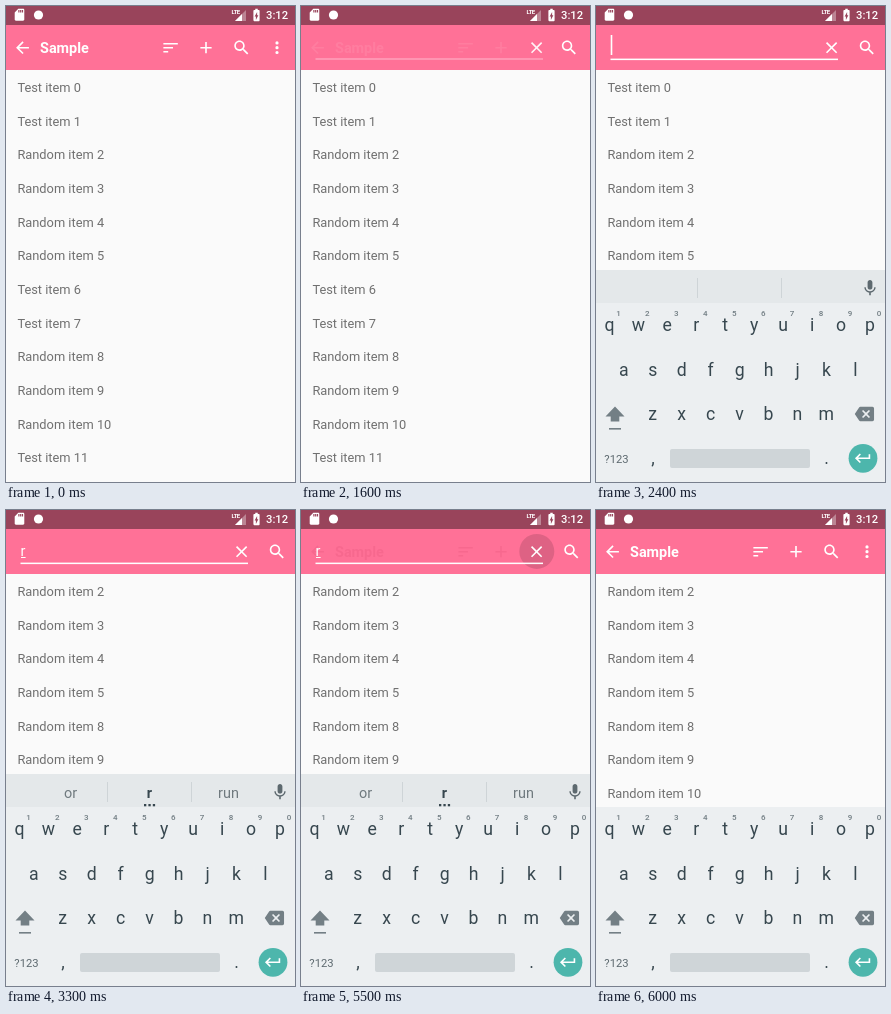
Recreate the animation shown at these times as an HTML page. Size 289 px wide and 476 px high, loop 7100 ms.

```html
<!DOCTYPE html>
<html lang="en">
<head>
<meta charset="utf-8">
<title>Search in a list</title>
<style>
html, body { margin: 0; width: 100%; height: 100%; overflow: hidden; background: #fafafa; }
svg { display: block; width: 100%; height: 100%; font-family: Roboto, sans-serif; }
</style>
</head>
<body>
<svg id="stage" viewBox="0 0 289 476" xmlns="http://www.w3.org/2000/svg"></svg>
<script>
const LOOP = 7100, STEP = 100;
const U = 0.803; // pixels per dp
const ROW = 33.68, BAR_Y = 41.7;
const INK = '#37474f', GREY = '#737f85';

const PATHS = {
  back: 'M20 11H7.83l5.59-5.59L12 4l-8 8 8 8 1.41-1.41L7.83 13H20v-2z',
  sort: 'M3 18h6v-2H3v2zM3 6v2h18V6H3zm0 7h12v-2H3v2z',
  add: 'M19 13h-6v6h-2v-6H5v-2h6V5h2v6h6v2z',
  search: 'M15.5 14h-.79l-.28-.27C15.41 12.59 16 11.11 16 9.5 16 5.91 13.09 3 9.5 3S3 5.91 3 9.5 5.91 16 9.5 16c1.61 0 3.09-.59 4.23-1.57l.27.28v.79l5 4.99L20.49 19l-4.99-5zm-6 0C7.01 14 5 11.99 5 9.5S7.01 5 9.5 5 14 7.01 14 9.5 11.99 14 9.5 14z',
  more: 'M12 8a2 2 0 1 0 0-4 2 2 0 0 0 0 4zm0 2a2 2 0 1 0 0 4 2 2 0 0 0 0-4zm0 6a2 2 0 1 0 0 4 2 2 0 0 0 0-4z',
  clear: 'M19 6.41L17.59 5 12 10.59 6.41 5 5 6.41 10.59 12 5 17.59 6.41 19 12 13.41 17.59 19 19 17.59 13.41 12z',
  card: 'M18 2h-8L4 8v12c0 1.1.9 2 2 2h12c1.1 0 2-.9 2-2V4c0-1.1-.9-2-2-2zm-6 6h-2V4h2v4zm3 0h-2V4h2v4zm3 0h-2V4h2v4z',
  battery: 'M15.67 4H14V2h-4v2H8.33C7.6 4 7 4.6 7 5.33v15.33C7 21.4 7.6 22 8.33 22h7.33c.74 0 1.34-.6 1.34-1.33V5.33C17 4.6 16.4 4 15.67 4zM11 20v-5.5H9L13 7v5.5h2L11 20z',
  mic: 'M12 14c1.66 0 2.99-1.34 2.99-3L15 5c0-1.66-1.34-3-3-3S9 3.34 9 5v6c0 1.66 1.34 3 3 3zm5.3-3c0 3-2.54 5.1-5.3 5.1S6.7 14 6.7 11H5c0 3.41 2.72 6.23 6 6.72V21h2v-3.28c3.28-.48 6-3.3 6-6.72h-1.7z',
  erase: 'M22 3H7c-.69 0-1.23.35-1.59.88L0 12l5.41 8.11c.36.53.9.89 1.59.89h15c1.1 0 2-.9 2-2V5c0-1.1-.9-2-2-2zm-3 12.59L17.59 17 14 13.41 10.41 17 9 15.59 12.59 12 9 8.41 10.41 7 14 10.59 17.59 7 19 8.41 15.41 12 19 15.59z',
  enter: 'M19 7v4H5.83l3.58-3.59L8 6l-6 6 6 6 1.41-1.41L5.83 13H21V7h-2z'
};

function add(parent, tag, attrs = {}, text) {
  const el = document.createElementNS('http://www.w3.org/2000/svg', tag);
  for (const key in attrs) el.setAttribute(key, attrs[key]);
  if (text !== undefined) el.textContent = text;
  parent.appendChild(el);
  return el;
}
const set = (el, key, value) => el.setAttribute(key, value);
const show = (el, on) => set(el, 'visibility', on ? 'visible' : 'hidden');
const group = (parent, attrs) => add(parent, 'g', attrs);
const rect = (parent, x, y, width, height, fill, rx = 0) =>
  add(parent, 'rect', { x, y, width, height, fill, rx });
const label = (parent, text, x, y, size, attrs) =>
  add(parent, 'text', { x, y, 'font-size': size, ...attrs }, text);
const place = (x, y, s) => `translate(${x - 12 * s} ${y - 12 * s}) scale(${s})`;
const icon = (parent, name, x, y, s = U, attrs) =>
  add(parent, 'path', { d: PATHS[name], transform: place(x, y, s), ...attrs });

const svg = document.getElementById('stage');
const clamp = v => Math.min(1, Math.max(0, v));
const ease = v => (1 - Math.cos(Math.PI * clamp(v))) / 2;
const mix = (a, b, k) => a + (b - a) * k;

rect(svg, 0, 0, 289, 476, '#fafafa');

// List
const list = group(svg, { fill: '#707070' });
const tests = [0, 1, 6, 7, 11];
let hits = 0;
const items = Array.from({ length: 12 }, (_, i) => {
  const test = tests.includes(i);
  const el = label(list, `${test ? 'Test' : 'Random'} item ${i}`, 11.4, 0, 16 * U);
  return { el, test, from: i, to: test ? i : hits++ };
});

// Status bar and toolbar
rect(svg, 0, 0, 289, 19.3, '#99445b');
rect(svg, 0, 19, 289, 45, '#ff7197');
const status = group(svg, { fill: '#fff' });
icon(status, 'card', 13.5, 8.8, 0.6);
add(status, 'circle', { cx: 32.5, cy: 9, r: 4.6 });
label(status, 'LTE', 225.6, 8.2, 6, { 'font-weight': 700, 'letter-spacing': -0.6 });
add(status, 'path', { d: 'M229 15L240 4V15Z', opacity: 0.35 });
add(status, 'path', { d: 'M229 15L236 8V15Z' });
icon(status, 'battery', 250.5, 9, 0.62);
label(status, '3:12', 260, 13.2, 14 * U, { 'font-weight': 500 });

const ripple = add(svg, 'circle', { cy: 41.4, fill: '#000' });

const bar = group(svg);
icon(bar, 'back', 16.5, BAR_Y);
label(bar, 'Sample', 34, 47, 18 * U, { 'font-weight': 700 });
icon(bar, 'sort', 164.6, BAR_Y);
icon(bar, 'add', 200, BAR_Y);
const more = icon(svg, 'more', 271, BAR_Y, U, { fill: '#fff' });
const search = icon(svg, 'search', 235.5, BAR_Y, U, { fill: '#fff' });

const field = group(svg, { fill: '#fff' });
const line = rect(field, 14.5, 52.6, 227.5, 1.5, '#fff');
icon(field, 'clear', 235.6, BAR_Y);
const typed = group(field);
label(typed, 'r', 14.6, 45.6, 18 * U);
rect(typed, 15, 47, 4.6, 1, '#fff');
const cursor = rect(svg, 14.7, 29, 1.6, 20, '#fff');

// Keyboard
const cover = rect(svg, 0, 264, 289, 212, '#fafafa');
const board = group(svg, { 'text-anchor': 'middle' });

const strip = group(board, { fill: '#6f797e' });
rect(strip, 0, 264, 289, 33, '#e4e8ea');
for (const x of [101, 185]) rect(strip, x, 272, 1, 20, '#ced4d7');
icon(strip, 'mic', 274, 282, U, { fill: '#5d696f' });
const hints = group(strip);
label(hints, 'or', 64.5, 287.5, 18 * U);
label(hints, 'r', 143.3, 287.5, 18 * U, { fill: INK, 'font-weight': 700 });
label(hints, 'run', 222.5, 287.5, 18 * U);
for (let i = 0; i < 3; i++) rect(hints, 138 + i * 4.4, 294, 2.3, 2.3, INK);

rect(board, 0, 297, 289, 179, '#eceff1');
const keys = group(board, { fill: INK });
const keyRow = (chars, x, y) => [...chars].forEach((c, i) =>
  label(keys, c, x + i * 28.95, y, 22 * U));
keyRow('qwertyuiop', 13.4, 325.4);
keyRow('asdfghjkl', 27.8, 370);
keyRow('zxcvbnm', 56.6, 414.4);
[...'1234567890'].forEach((c, i) =>
  label(keys, c, 22.4 + i * 28.95, 310, 8, { fill: '#717d83', 'font-weight': 500 }));
add(keys, 'path', { d: 'M19 400.5L28.5 410.5H23.3V415.5H14.7V410.5H9.5Z', fill: GREY });
rect(keys, 13, 422, 12, 1.6, GREY);
icon(keys, 'erase', 268.4, 408, U, { fill: GREY });
label(keys, '?123', 20.5, 456.6, 14 * U, { fill: '#5d696f' });
label(keys, ',', 57, 458, 22 * U);
label(keys, '.', 230.5, 458, 22 * U);
rect(keys, 74, 443, 140, 19, '#cfd5d8', 2);
add(keys, 'circle', { cx: 267, cy: 452.3, r: 14.4, fill: '#4db6ac' });
icon(keys, 'enter', 267, 452.3, U, { fill: '#fff' });

const between = (t, a, b) => t >= a && t < b;

function drawBar(t) {
  const closing = t >= 5500;
  const phase = ease((t - (closing ? 5500 : 1200) + 40) / 540);
  const open = closing ? 1 - phase : t < 1200 ? 0 : phase;
  const ghost = closing && t < 5600;

  set(bar, 'fill', ghost ? '#d9486f' : '#fff');
  set(bar, 'opacity', ghost ? 0.2 : 1 - open);
  set(field, 'opacity', open);
  set(search, 'transform', place(mix(235.5, 271, open), BAR_Y, U));
  show(more, t < 1200 || t >= 6000);

  const focused = t >= 2000;
  set(line, 'height', focused ? 1.5 : 0.8);
  set(line, 'opacity', focused ? 1 : 0.7);
  show(typed, t >= 2600);

  const start = closing ? 5500 : 1200;
  set(ripple, 'cx', closing ? 235.8 : 237.8);
  set(ripple, 'r', closing ? 17.5 : 16.5);
  set(ripple, 'opacity', t < start ? 0 : 0.13 * clamp(1 - (t - start) / 400));
}

function drawList(t) {
  const fade = clamp(1 - (t - 2500) / 200);
  const move = ease((t - 2600) / 300);
  for (const { el, test, from, to } of items) {
    set(el, 'y', 86 + ROW * mix(from, to, move));
    set(el, 'opacity', test ? fade : 1);
  }
}

function drawKeyboard(t) {
  const rise = clamp((t - 2200) / 200);
  show(cover, between(t, 2200, 2400));
  set(board, 'opacity', rise);
  set(board, 'transform', `translate(0 ${50 * (1 - rise) ** 2})`);
  set(strip, 'display', t < 5800 ? 'inline' : 'none');
  set(hints, 'opacity', t >= 2700 ? 1 : 0);
}

function draw(time) {
  const t = Math.floor(time % LOOP / STEP) * STEP;
  drawBar(t);
  drawList(t);
  drawKeyboard(t);
  show(cursor, between(t, 2000, 3300) || between(t, 3700, 4200) || between(t, 4700, 5100));
  set(cursor, 'x', t < 2600 ? 14.7 : 19.3);
}

const begin = performance.now();
function tick() {
  draw(performance.now() - begin);
  requestAnimationFrame(tick);
}
tick();
</script>
</body>
</html>
```
